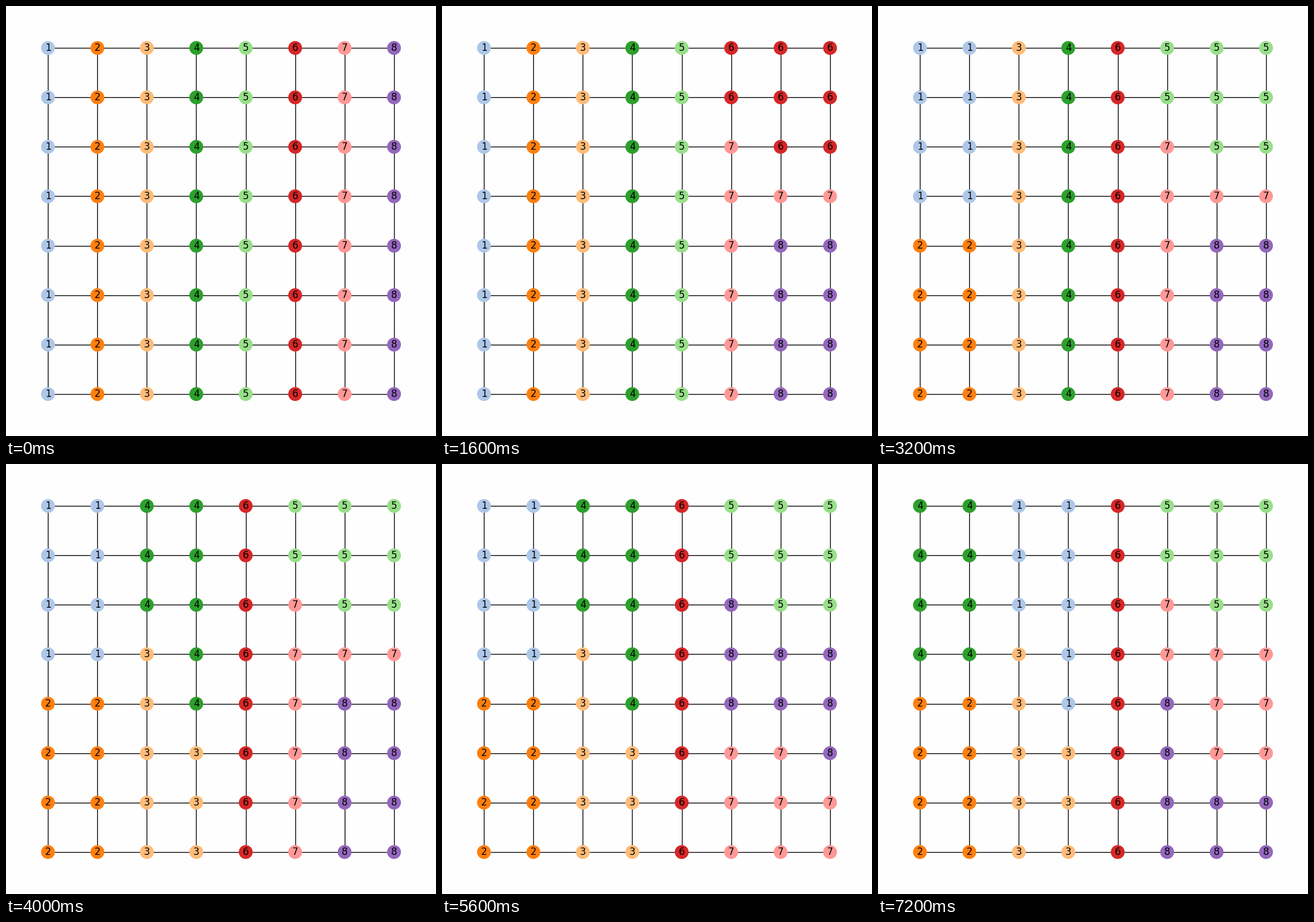
Write a matplotlib script that moves like this. It is 748 by 748 pixels and loops after 8000 ms.

```python
import matplotlib.pyplot as plt
import numpy as np
from matplotlib.animation import FuncAnimation
from matplotlib.collections import LineCollection

SIZE, DPI = 748, 100
N, STEP = 8, 86
COLORS = np.array(plt.get_cmap("tab20").colors)[1:N + 1]

# How strongly the distance to the pivot column counts against the row.
FLAT, SLANT, STEEP = 0.1, 2, 10

# Two districts merge and split again: (first, second, pivot column, slope).
MERGES = [
    (7, 8, 8, FLAT), (6, 7, 8, FLAT), (1, 2, 2, FLAT),
    (6, 5, 5, STEEP), (4, 3, 4, SLANT), (8, 7, 7, FLAT),
    (8, 7, 8, FLAT), (4, 1, 1, STEEP), (7, 8, 7.5, SLANT),
]


def recombine(grid, first, second, pivot, slope):
    """Give the half of the merged cells nearest the top pivot to first."""
    rows, cols = np.nonzero((grid == first) | (grid == second))
    order = np.argsort(rows + slope * np.abs(cols + 1 - pivot), kind="stable")
    new = grid.copy()
    new[rows, cols] = second
    head = order[:N]
    new[rows[head], cols[head]] = first
    return new


states = [np.tile(np.arange(1, N + 1), (N, 1))]
for merge in MERGES:
    states.append(recombine(states[-1], *merge))

fig = plt.figure(figsize=(SIZE / DPI, SIZE / DPI), dpi=DPI, facecolor="#fefefe")
ax = fig.add_axes([0, 0, 1, 1])
ax.set_xlim(0, SIZE)
ax.set_ylim(SIZE, 0)
ax.axis("off")

pos = SIZE / 2 + STEP * (np.arange(N) - (N - 1) / 2)

# Lines sit on whole pixels of a canvas one pixel larger, scaled down.
scale = (SIZE + 1) / SIZE
rails = (np.rint(pos * scale) + 0.5) / scale
first, last = rails[0], rails[-1]
lines = [[(p, first), (p, last)] for p in rails]
lines += [[(first, p), (last, p)] for p in rails]
edges = LineCollection(lines, colors="black", linewidths=1, zorder=1)
edges.set_snap(False)
ax.add_collection(edges)

xs, ys = (a.ravel() for a in np.meshgrid(pos, pos))
nodes = ax.scatter(xs, ys, s=300, c=COLORS[states[0].ravel() - 1],
                   linewidths=0, zorder=2)
# The small offset keeps odd-width digits from rounding to the left.
labels = [ax.text(x + 0.1, y, "", ha="center", va="center", fontsize=12,
                  family="DejaVu Sans", color="black", zorder=3)
          for x, y in zip(xs, ys)]


def update(i):
    districts = states[i].ravel()
    nodes.set_facecolors(COLORS[districts - 1])
    for text, d in zip(labels, districts):
        text.set_text(str(d))
    return [nodes, *labels]


anim = FuncAnimation(fig, update, frames=len(states), interval=800,
                     repeat=True, repeat_delay=0)
plt.show()
```
